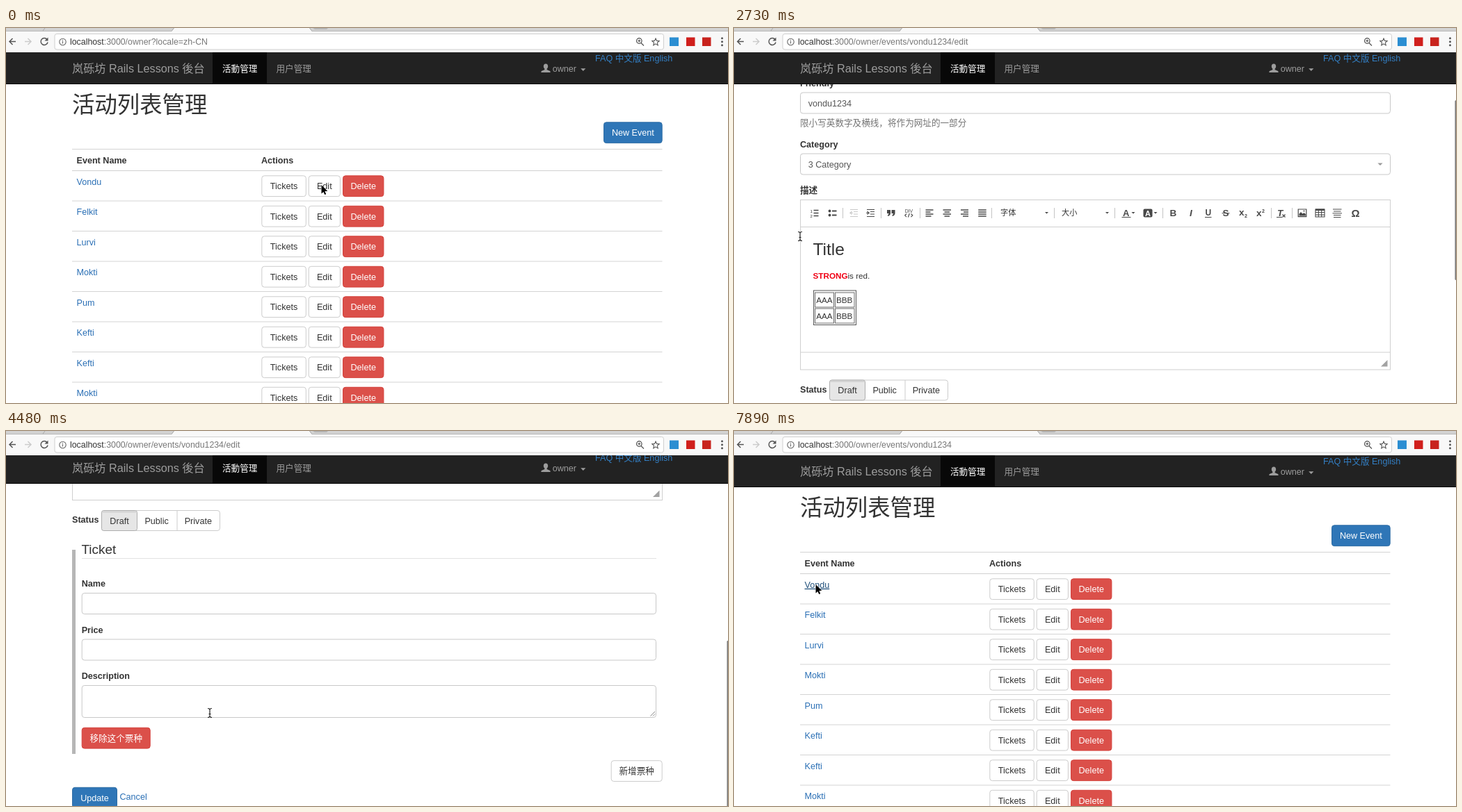
Recreate the animation shown at these times as an HTML page. Size 1038 px wide and 540 px high, loop 8000 ms.

```html
<!DOCTYPE html>
<html lang="zh-CN">
<head>
<meta charset="utf-8">
<title>Event pages</title>
<style>
html, body { margin: 0; width: 100%; height: 100%; overflow: hidden; background: #fff; }
svg { display: block; width: 1038px; height: 540px; }
text { font-family: "Liberation Sans", "Noto Sans CJK SC", "Noto Sans CJK", sans-serif; font-size: 12.6px; fill: #333; }
</style>
</head>
<body>
<svg id="stage" viewBox="0 0 1038 540" xmlns="http://www.w3.org/2000/svg"></svg>
<script>
const LOOP = 8000, MAX_SCROLL = 516.5;
const LINK = '#2a6fb5', BLUE = '#2f76b7', RED = '#db504a', ICON = '#484848';

const STEPS = [0, 780, 930, 1080, 1230, 1430, 1580, 1900, 2050, 2200, 2380, 2550, 2730, 2880,
  3030, 3180, 3320, 3610, 3760, 3940, 4120, 4300, 4480, 4660, 4840, 5020, 5640, 5790, 6090,
  6420, 6570, 6870, 7020, 7170, 7310, 7450, 7890];

const POINTER = [[1230, 453.5, 226], [1900, 401, 300], [2050, 401, 300], [2730, 95, 300],
  [2880, 109, 384], [3320, 303, 430], [3610, 303, 430], [3940, 300, 401], [4480, 293, 406],
  [4660, 293, 406], [5020, 119, 529], [6090, 119, 529], [6420, 152, 420], [6570, 139, 324],
  [6720, 139, 324], [7450, 117.5, 221]];
const SCROLL = [[1950, 0], [2730, 129], [3520, 129], [3940, 438.5], [4300, 523],
  [4480, 521.5], [4840, MAX_SCROLL]];

const text = (x, y, s, attr = '') => `<text x="${x}" y="${y}" ${attr}>${s}</text>`;
const bold = (x, y, s) => text(x, y, s, 'font-weight="700"');
const fill = c => `style="fill:${c}"`;
const rect = (x, y, w, h, color, attr = '') =>
  `<rect x="${x}" y="${y}" width="${w}" height="${h}" fill="${color}" ${attr}/>`;
const path = (d, color, w = 1, attr = '') =>
  `<path d="${d}" fill="none" stroke="${color}" stroke-width="${w}" ${attr}/>`;
const shape = (d, color) => `<path d="${d}" fill="${color}"/>`;
const hline = (x1, x2, y, color) => path(`M${x1} ${y}H${x2}`, color);
const caret = (x, y, r, color) => shape(`M${x - r} ${y}h${2 * r}l${-r} ${r}z`, color);
const group = (id, s, attr = '') => `<g id="${id}" ${attr}>${s}</g>`;

function button(x, y, w, label, color = '#fff', edge = '#ccc', ink = '#333', id = '') {
  return rect(x, y, w, 29.8, color, `rx="3.6" stroke="${edge}" ${id && `id="${id}"`}`) +
    text(x + w / 2, y + 19.3, label, `text-anchor="middle" ${fill(ink)}`);
}
function field(x, y, w, value = '', h = 30) {
  return rect(x, y, w, h, '#fff', 'rx="3.6" stroke="#c8c8c8"') +
    text(x + 11.2, y + 20, value, fill('#555'));
}

function browser() {
  let s = rect(0, 0, 1038, 5, '#d2d2d2') + rect(0, 5, 1038, 30, '#f8f8f8') +
    hline(0, 1038, 4.5, '#b9b9b9') +
    shape('M238 5l4-5h194l4 5z', '#f8f8f8') +
    path('M53 4l3-4M238 4.5l4-5M440 4.5l-4-5', '#a8a8a8') +
    shape('M441 0h22l-2 2h-17z', '#b4b4b4') +
    rect(70, 8.5, 875.5, 22.5, '#fff', 'rx="3" stroke="#cfcfcf"') +
    path('M14 19.5H5M9.5 15l-4.5 4.5 4.5 4.5', '#555', 1.5) +
    path('M27 19.5h9M31.5 15l4.5 4.5-4.5 4.5', '#ccc', 1.5);
  s += group('reload', path('M59 16.3a5 5 0 1 0 1 4.2', '#555', 1.5) + shape('M60.5 13.5v5h-5z', '#555'));
  s += group('stop', path('M50.5 15l9 9M59.5 15l-9 9', '#555', 1.6));
  s += path('M76.8 20a4.7 4.7 0 1 0 9.4 0a4.7 4.7 0 1 0 -9.4 0M81.5 19v3.4M81.5 17v1.2', '#666', 1.1);
  s += text(92, 24.2, 'localhost<tspan id="url" fill="#777"></tspan>', 'style="font-size:12.35px"');
  s += path('M906.5 18.5a3.8 3.8 0 1 0 7.6 0a3.8 3.8 0 1 0 -7.6 0M913 21.5l4 4M908.3 18.5h4M910.3 16.5v4', '#555', 1.2);
  s += path('M934 15l1.5 3.4 3.7.3-2.8 2.5.8 3.7-3.2-2-3.2 2 .8-3.7-2.8-2.5 3.7-.3z', '#555', 1.1);
  s += rect(954, 13.5, 13, 12.5, '#2b8ed2') + rect(978, 13.5, 12.5, 12.5, '#d01f1c') +
    rect(1001, 13.5, 12.5, 12.5, '#c8231d');
  for (const y of [14.8, 19.8, 24.8]) s += `<circle cx="1029.5" cy="${y}" r="1.5" fill="#555"/>`;
  return s;
}

function navbar() {
  const gray = fill('#9d9d9d');
  return rect(0, 35, 1038, 46, '#222') + rect(297, 35, 78, 46, '#080808') + rect(0, 80, 1038, 1, '#080808') +
    text(95, 64, '岚砾坊 Rails Lessons 後台', 'style="font-size:16.2px;fill:#9d9d9d"') +
    text(311, 62.7, '活動管理', 'font-weight="500" ' + fill('#fff')) +
    text(388.5, 62.7, '用户管理', gray) +
    shape('M776 51.5c2 0 3.2 1.6 3.2 3.6 0 1.600-.7 3-1.600 3.800v1l4 1.800c.9.4 1 1 1 2.300h-13.200c0-1.300.1-1.900 1-2.300l4-1.800v-1c-.9-.8-1.600-2.200-1.600-3.800 0-2 1.200-3.600 3.200-3.600z', '#9d9d9d') +
    text(785.7, 62.8, 'owner', gray) + caret(829.8, 58.3, 3.6, '#9d9d9d') +
    text(847, 48.4, 'FAQ 中文版 English', fill('#337fc4'));
}

function listPage() {
  const names = ['Vondu', 'Felkit', 'Lurvi', 'Mokti', 'Pum', 'Kefti', 'Kefti', 'Mokti'];
  let s = text(95, 121.5, '活动列表管理', 'style="font-size:32.4px" font-weight="500"') +
    button(859.5, 135.8, 83.7, 'New Event', BLUE, '#2e6da4', '#fff') +
    hline(95, 943.5, 174.5, '#d4d4d4') + bold(101.5, 194.6, 'Event Name') + bold(367, 194.6, 'Actions') +
    hline(95, 943.5, 205.5, '#d0d0d0');
  names.forEach((name, i) => {
    const y = 43.5 * i;
    s += text(101.5, 225.8 + y, name, fill(LINK) + (i ? '' : ' id="first"')) +
      button(367.8, 212.8 + y, 63.5, 'Tickets') +
      button(435.2, 212.8 + y, 45.2, 'Edit', '#fff', '#ccc', '#333', i ? '' : 'edit') +
      button(484.5, 212.8 + y, 58.4, 'Delete', RED, '#d43f3a', '#fff') +
      hline(95, 943.5, 249 + y, '#d4d4d4');
  });
  return s;
}

function toolbar() {
  const Y = 395.5;
  const bars = (x, rows, color = ICON) =>
    path(rows.map(([dx, w], i) => `M${x + dx} ${Y - 4.5 + i * 3}h${w}`).join(''), color, 1.7);
  const sign = (x, s, style, dy = 4.700) => text(x, Y + dy, s, `text-anchor="middle" style="fill:${ICON};font-size:13.5px;${style}"`);
  let s = '';
  for (const x of [156.5, 211.5, 267.5, 370.5, 460.5, 547.5, 616.5, 772.5, 802.5]) s += path(`M${x} 388v15`, '#c4c4c4');
  // lists and indents
  s += path('M114.500 391.500h7M114.500 395.500h7M114.500 399.500h7', ICON, 1.3) +
    text(109.5, 395, '1', 'style="font-size:6px"') + text(109.5, 401.5, '2', 'style="font-size:6px"') +
    path('M141 392.500h6.500M141 398.500h6.500', ICON, 1.800) +
    '<circle cx="137.500" cy="392.500" r="1.900" fill="#484848"/><circle cx="137.500" cy="398.500" r="1.900" fill="#484848"/>';
  [[166, '#c8c8c8', 1], [190, ICON, -1]].forEach(([x, c, dir]) => {
    s += path(`M${x + 1} 390.500h11M${x + 6} 393.500h6M${x + 6} 397h6M${x + 1} 400.500h11`, c, 1.200) +
      path(`M${x} 395.300h5M${x + 2.5 + dir} 393l${-2.300 * dir} 2.300 ${2.300 * dir} 2.300`, c, 1.100);
  });
  for (const x of [220, 226.5]) s += shape(`M${x} 391h5v4.500q0 3-3.500 4.500l-.7-1.200q1.500-1 1.700-2.800h-2.500z`, ICON);
  s += text(251.3, 395, 'DIV', `text-anchor="middle" style="font-size:6.800px;fill:${ICON}"`) +
    path('M248 396.500l-2.300 2.300 2.300 2.300M254.500 396.500l2.300 2.300-2.300 2.300M252.300 396l-2 5.500', ICON, 1.100);
  // alignment
  s += bars(275.5, [[0, 11], [0, 7], [0, 11], [0, 8]]) + bars(300.5, [[0, 11.5], [2, 7.5], [0, 11.5], [2, 7.5]]) +
    bars(326, [[0, 11], [4, 7], [0, 11], [3, 8]]) + bars(351.2, [[0, 11.5], [0, 11.5], [0, 11.5], [0, 11.5]]);
  s += text(383, 398.5, '字体', 'style="font-size:11.200px"') + text(471, 398.5, '大小', 'style="font-size:11.200px"');
  for (const x of [449.5, 536.5, 574, 606]) s += caret(x, 394, 2.5, ICON);
  // text styles
  s += sign(563.8, 'A', 'font-weight:700;font-size:13px', 4) + hline(557.5, 570.5, 401.5, ICON) +
    rect(588.5, 389.5, 13, 12, ICON, 'rx="2"') + sign(595, 'A', 'font-weight:700;font-size:11px;fill:#fff', 4) +
    sign(631.3, 'B', 'font-weight:700') +
    sign(657, 'I', 'font-weight:700;font-style:italic;font-family:"Liberation Serif",serif') +
    sign(681.8, 'U', 'font-weight:700;font-size:12px', 3.5) + hline(677, 686.5, 401.5, ICON) +
    sign(707, 'S', 'font-weight:700') + hline(701.5, 712.5, 395.7, ICON) +
    sign(729.7, 'x', 'font-weight:700', 3.800) + sign(736, '2', 'font-size:7px;font-weight:700', 6) +
    sign(754.8, 'x', 'font-weight:700', 4.800) + sign(761, '2', 'font-size:7px;font-weight:700', -1) +
    sign(785, 'T', 'font-style:italic;font-weight:700') + hline(780, 788, 401.5, ICON) +
    path('M788.500 397.500l4 4M792.500 397.500l-4 4', ICON, 1.200);
  // inserts
  s += path('M811.200 390h11.600v10.600h-11.600z', ICON, 1.200) + shape('M812.500 399.500v-3l2.500-2.500 2.500 2.500 2-1.500 2.300 2v2.500z', ICON) +
    '<circle cx="819.500" cy="392.500" r="1" fill="#484848"/>' +
    path('M836 390h13v11h-13zM836 394.500h13M836 398h13M840.300 391v10M844.700 391v10', ICON, 1.100) + rect(836, 389.5, 13, 2.5, ICON) +
    path('M861 390h12.500M862 393h10.500M862 398.500h10.500M862 401.500h10.500', ICON, 1) + hline(860.5, 874, 395.800, ICON) +
    sign(893.4, 'Ω', 'font-weight:700;font-size:15px', 5);
  return s;
}

function editor() {
  let s = rect(95.5, 376.5, 848, 244.5, '#fff', 'stroke="#cfcfcf"') +
    hline(95, 943.5, 415.5, '#cfcfcf') + hline(95, 943.5, 596, '#cfcfcf') + toolbar() +
    text(113.5, 456, 'Title', 'style="font-size:24.500px"') +
    text(113.5, 490, '<tspan fill="#f00014" font-weight="700">STRONG</tspan>is red.', 'style="font-size:11.700px"') +
    rect(114.5, 507, 61, 49.500, 'none', 'stroke="#555"');
  [510, 533].forEach(y => {
    s += rect(116.5, y, 27, 21, 'none', 'stroke="#666"') + rect(145.5, y, 27.5, 21, 'none', 'stroke="#666"') +
      text(118.2, y + 14.700, 'AAA', 'style="font-size:11.700px"') + text(147, y + 14.700, 'BBB', 'style="font-size:11.700px"');
  });
  return s + shape('M939.500 607v9.500h-9.500z', '#a2a2a2');
}

function editPage() {
  let s = text(95, 118.3, 'Edit Event', 'style="font-size:32.400px;letter-spacing:.55px;stroke:#333;stroke-width:.7px"') +
    bold(95, 146.5, '活动名称') + field(95.5, 155.7, 848, 'Vondu') +
    bold(95, 213, 'Friendly') + field(95.5, 222, 848, 'vondu1234') +
    text(95, 270.3, '限小写英数字及横线，将作为网址的一部分', fill('#737373')) +
    bold(95, 300.7, 'Category') + field(95.5, 310, 848, '3 Category') + caret(929, 323.500, 3.600, '#999') +
    bold(95, 367.2, '描述') + editor();
  s += bold(95, 653.7, 'Status') + rect(137.5, 636, 170, 29, '#fff', 'rx="3.600" stroke="#ccc"') +
    path('M246 636v29', '#ccc') + rect(137.5, 636, 51, 29, '#e6e6e6', 'rx="3" stroke="#adadad"') +
    path('M138.500 638h49', '#d3d3d3', 2);
  [[163, 'Draft'], [216.6, 'Public'], [276.3, 'Private']].forEach(([x, label]) => s += text(x, 655, label, 'text-anchor="middle"'));
  s += rect(95, 692.5, 5, 294, '#b6b6b6') + text(108.500, 698, 'Ticket', 'style="font-size:18.900px"') +
    hline(109, 935, 705, '#e2e2e2') +
    bold(108.7, 745.6, 'Name') + field(109.2, 755, 825.3) +
    bold(108.7, 812, 'Price') + field(109.2, 821.500, 825.3) +
    bold(108.7, 878.4, 'Description') + field(109.2, 888, 825.3, '', 46) +
    path('M926.500 932l6.500-6.500M930 932l3-3', '#888') +
    button(109.2, 948.8, 98, '移除这个票种', RED, '#d43f3a', '#fff') +
    button(870.2, 996.2, 73, '新增票种');
  return s + group('update', button(95.5, 1034.800, 64, 'Update', BLUE, '#2e6da4', '#fff', 'updateBox')) +
    text(163.5, 1052.800, 'Cancel', fill(LINK));
}

const ARROW = 'M0 0V12.500L2.900 9.900 4.700 14 6.700 13.200 4.900 9.100H8.800Z';
const BEAM = 'M-3 -6.500q3 0 3 2q0 -2 3 -2M0 -5V5M-3 6.500q3 0 3 -2q0 2 3 2M-1.500 1.500h3';

const stage = document.getElementById('stage');
stage.innerHTML = '<clipPath id="view"><rect y="35" width="1038" height="505"/></clipPath>' +
  rect(0, 0, 1038, 540, '#fff') +
  group('page', group('list', listPage()) + group('form', editPage()) + group('nav', navbar()) +
    rect(1036.500, 0, 4, 259, '#777', 'id="thumb" rx="1.500"'), 'clip-path="url(#view)"') +
  browser() +
  group('arrow', `<path d="${ARROW}" fill="#000" stroke="#fff" stroke-width="1" paint-order="stroke"/>`) +
  group('beam', path(BEAM, '#fff', 2.600) + path(BEAM, '#222', 1.200));

const el = id => document.getElementById(id);
const show = (id, on) => el(id).setAttribute('display', on ? 'inline' : 'none');
const move = (id, x, y) => el(id).setAttribute('transform', `translate(${x} ${y})`);

// Eased value of a keyed track [time, ...values]
function track(keys, t) {
  if (t <= keys[0][0]) return keys[0].slice(1);
  const n = keys.findIndex(k => k[0] > t);
  if (n < 0) return keys[keys.length - 1].slice(1);
  const a = keys[n - 1], b = keys[n], p = (t - a[0]) / (b[0] - a[0]), e = p * p * (3 - 2 * p);
  return a.slice(1).map((v, i) => v + (b[i + 1] - v) * e);
}

function address(t) {
  if (t < 780) return '?locale=zh-CN';
  if (t < 5640) return '/events/vondu1234/edit';
  return t < 7890 ? '/events' : '/events/vondu1234';
}

function render(ms) {
  const t = STEPS.filter(s => s <= ms).pop();
  const form = t >= 1080 && t < 6090;
  const scroll = form ? track(SCROLL, t)[0] : 0;
  const [x, y] = track(POINTER, t);
  const loading = t >= 5640 && t < 6090;
  const beam = t >= 2550 && t < 4840;

  show('list', !form);
  show('form', form);
  move('form', 0, -scroll);
  move('nav', 0, Math.min(0, MAX_SCROLL - scroll));
  show('thumb', form && t >= 2050);
  el('thumb').setAttribute('y', 39 + scroll * 0.504);

  el('url').textContent = ':3000/owner' + address(t);
  show('stop', loading);
  show('reload', !loading);

  el('edit').setAttribute('fill', t >= 780 && t < 1080 ? '#e6e6e6' : '#fff');
  const hover = t > 6090 && y < 228;
  el('first').style.fill = hover ? '#23527c' : LINK;
  el('first').style.textDecoration = hover ? 'underline' : 'none';
  el('updateBox').setAttribute('fill', t < 5020 || t >= 5790 ? BLUE : t < 5640 ? '#286090' : '#204d74');
  el('update').setAttribute('opacity', t >= 5790 ? 0.65 : 1);

  show('arrow', !beam);
  show('beam', beam);
  move(beam ? 'beam' : 'arrow', x, y);
}

function tick() {
  render(performance.now() % LOOP);
  requestAnimationFrame(tick);
}
tick();
</script>
</body>
</html>
```
